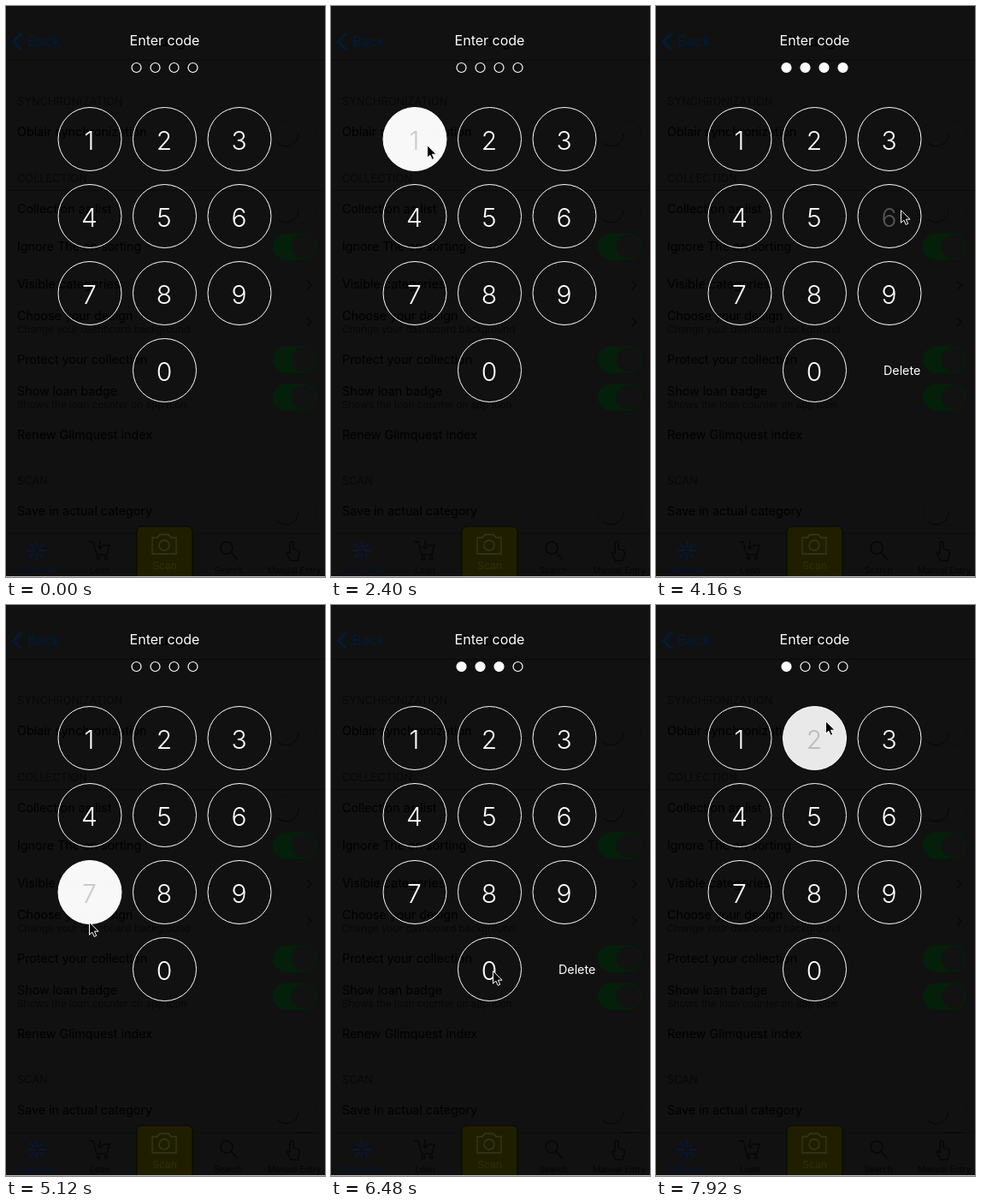
These frames come from a looping animation (373 px wide and 667 px high, 8000 ms). An HTML page:

```html
<!DOCTYPE html>
<html lang="en">
<head>
<meta charset="utf-8">
<title>Enter code</title>
<style>
  html, body { margin: 0; width: 100%; height: 100%; overflow: hidden; background: #111; }
  svg { display: block; width: 100vw; height: 100vh; }
  text { font-family: Inter, "Liberation Sans", sans-serif; font-size: 14.3px; }
  .head { font-size: 12.8px; fill: #080808; }
  .sub { font-size: 11.7px; fill: #080808; }
  .tab { font-size: 10px; fill: #060606; text-anchor: middle; }
  .icon { fill: none; stroke: #060606; stroke-width: 1.3; }
  .digit { font-size: 30px; font-weight: 300; text-anchor: middle; }
  .mid { text-anchor: middle; }
</style>
</head>
<body>
<svg viewBox="0 0 373 667" preserveAspectRatio="none">
  <rect width="373" height="667" fill="#111"/>
  <g id="page">
    <path d="M0 63.5H373M0 215.5H373" stroke="#0a0a0a"/>
    <path d="M18 32L8.500 41.500L18 51" fill="none" stroke="#001c38" stroke-width="3"/>
    <text x="25" y="47" fill="#001c38" style="font-size:16.500px">Back</text>
    <text class="mid" x="186" y="47" style="font-size:16.500px;font-weight:600">Settings</text>
  </g>
  <g id="tabs">
    <path d="M0 616.500H373" stroke="#0d0d0d"/>
    <path d="M337 616.500H360" stroke="#070707"/>
    <rect x="153" y="608" width="65" height="62" rx="6" fill="#1f1f00" stroke="#080800"/>
    <g fill="none" stroke="#383820" stroke-width="1.300">
      <path d="M171 621H177L180 617.500H190L193 621H199V640H171Z"/>
      <circle cx="185" cy="630" r="6"/>
    </g>
    <text class="mid" x="185.500" y="658" fill="#303010" style="font-size:12px">Scan</text>
    <g stroke="#08183a" stroke-width="1.800">
      <path d="M36 625V633M36 639V647M25 636H33M39 636H47M28 628L33 633M39 639L44 644M44 628L39 633M33 639L28 644"/>
    </g>
    <text class="tab" x="35.500" y="663" style="fill:#08142c">Collection</text>
    <g class="icon">
      <path d="M97 626H102L106 641H118L121 630H113M110 624V634M107 631L110 634L113 631"/>
      <circle cx="108" cy="645" r="1.800"/><circle cx="117" cy="645" r="1.800"/>
      <circle cx="258" cy="633" r="7"/><path d="M263 638L271 647"/>
      <path d="M332 640V627Q334 624 336 627V634L342 636Q344 637 343 641L341 648H333L328 639Q329 636 332 640"/>
    </g>
    <text class="tab" x="110" y="663">Loan</text>
    <text class="tab" x="260" y="663">Search</text>
    <text class="tab" x="337" y="663">Manual Entry</text>
    <rect y="666" width="373" height="1" fill="#bbb"/>
  </g>
  <g id="pad" fill="#fff"></g>
  <text class="mid" x="185.500" y="46" fill="#fff" style="font-size:16px">Enter code</text>
  <text id="del" x="266" y="431" fill="#fff">Delete</text>
  <path id="cursor" d="M.5 .7V15.300L3.900 12.200L6.200 17.400L8.700 16.300L6.400 11.200H11Z"
        fill="#000" stroke="#fff" stroke-linejoin="round"/>
</svg>
<script>
const LOOP = 8000, STEP = 80, DOT_DELAY = 90, CLEAR_DELAY = 250;
const $ = id => document.getElementById(id);
const clamp = v => Math.max(0, Math.min(1, v));

function add(parent, tag, attrs, text) {
  const el = document.createElementNS('http://www.w3.org/2000/svg', tag);
  for (const k in attrs) el.setAttribute(k, attrs[k]);
  if (text) el.textContent = text;
  parent.appendChild(el);
  return el;
}

// Settings page behind the pad
const page = $('page');
const label = (y, text, cls = '') => add(page, 'text', { x: 13, y, class: cls }, text);
label(116, 'SYNCHRONIZATION', 'head');
label(206, 'COLLECTION', 'head');
label(559, 'SCAN', 'head');
label(152, 'Oblair synchronization');
label(242, 'Collection as list');
label(286, 'Ignore The on sorting');
label(330, 'Visible categories');
label(367, 'Choose your design');
label(382, 'Change your dashboard background', 'sub');
label(418, 'Protect your collection');
label(455, 'Show loan badge');
label(470, 'Shows the loan counter on app icon', 'sub');
label(506, 'Renew Glimquest index');
label(595, 'Save in actual category');

for (const y of [281, 413, 457]) {
  add(page, 'rect', { x: 312, y: y - 15.5, width: 51, height: 31, rx: 15.5, fill: '#04200a' });
  add(page, 'circle', { cx: 347.5, cy: y, r: 14, fill: '#121212' });
}
for (const y of [149, 238, 591]) {
  add(page, 'rect', { x: 312, y: y - 15.5, width: 51, height: 31, rx: 15.5, fill: 'none', stroke: '#0f0f0f' });
  add(page, 'path', { d: `M342 ${y}A14.500 14.500 0 0 1 318 ${y + 11}`, fill: 'none', stroke: '#060606' });
}
for (const y of [326, 369]) {
  add(page, 'path', { d: `M352 ${y - 5}l5 5l-5 5`, fill: 'none', stroke: '#080808', 'stroke-width': 1.5 });
}

// Keypad and code dots
const pad = $('pad');
const keys = [...'1234567890'].map((d, i) => {
  const cx = d === '0' ? 185.5 : 98 + (i % 3) * 87.5;
  const cy = 155.5 + Math.floor(i / 3) * 90;
  return {
    d,
    ring: add(pad, 'circle', { cx, cy, r: 37, stroke: '#fff', 'fill-opacity': 0 }),
    digit: add(pad, 'text', { x: cx - 0.5, y: cy + 12, class: 'digit' }, d)
  };
});
const dots = [0, 1, 2, 3].map(i =>
  add(pad, 'circle', { cx: 152.5 + 22 * i, cy: 72, r: 5.5, stroke: '#fff', 'stroke-width': 1.2 }));

// Each attempt: list of [time, key]
const attempts = [
  [[2320, '1'], [2800, '2'], [3280, '6'], [3920, '6']],
  [[5040, '7'], [5600, '8'], [5920, '8'], [6500, '0']],
  [[7830, '2']]
];
const presses = attempts.flat();

// Curves as [time, value...]
const fillCurve = [[0, .5], [80, .97], [160, .45], [230, 0]];
const toneCurve = [[0, 235], [80, 200], [160, 90], [240, 85], [440, 255]];
const route = [
  [480, 274, 646], [720, 320, 444], [1120, 320, 444], [1260, 319, 453], [1840, 112, 162],
  [2480, 112, 162], [2800, 180, 164], [3040, 180, 164], [3280, 286, 238],
  [4560, 286, 238], [5040, 97, 370], [5280, 97, 370], [5600, 182, 346],
  [6080, 182, 346], [6400, 189, 427], [7280, 189, 427], [7680, 198, 135]
];

function sample(curve, t, ease = u => u) {
  const last = curve[curve.length - 1];
  if (t >= last[0]) return last.slice(1);
  const i = Math.max(1, curve.findIndex(p => p[0] > t));
  const a = curve[i - 1], b = curve[i];
  const u = ease(clamp((t - a[0]) / (b[0] - a[0])));
  return a.slice(1).map((v, k) => v + (b[k + 1] - v) * u);
}
const smooth = u => u * u * (3 - 2 * u);

function draw(t) {
  for (const key of keys) {
    const press = presses.filter(p => p[1] === key.d && p[0] <= t).pop();
    const age = press ? t - press[0] : 1e4;
    const tone = Math.round(sample(toneCurve, age)[0]);
    key.ring.setAttribute('fill-opacity', sample(fillCurve, age)[0]);
    key.digit.setAttribute('fill', `rgb(${tone},${tone},${tone})`);
  }

  let count = 0, shown = 0;
  for (const list of attempts) {
    const end = list.length === 4 ? list[3][0] + CLEAR_DELAY : Infinity;
    const start = list[0][0] + DOT_DELAY;
    if (t < start || t >= end) continue;
    count = list.filter(p => t >= p[0] + DOT_DELAY).length;
    shown = clamp((t - start) / 160);
  }
  dots.forEach((dot, i) => dot.setAttribute('fill-opacity', i < count ? 1 : 0));
  $('del').setAttribute('opacity', shown);

  const [x, y] = sample(route, t, smooth);
  $('cursor').setAttribute('transform', `translate(${x} ${y})`);
  $('cursor').setAttribute('visibility', t < route[0][0] ? 'hidden' : 'visible');
}

const began = performance.now();
function tick() {
  const t = (performance.now() - began) % LOOP;
  draw(Math.floor(t / STEP) * STEP);
  requestAnimationFrame(tick);
}
tick();
</script>
</body>
</html>
```
